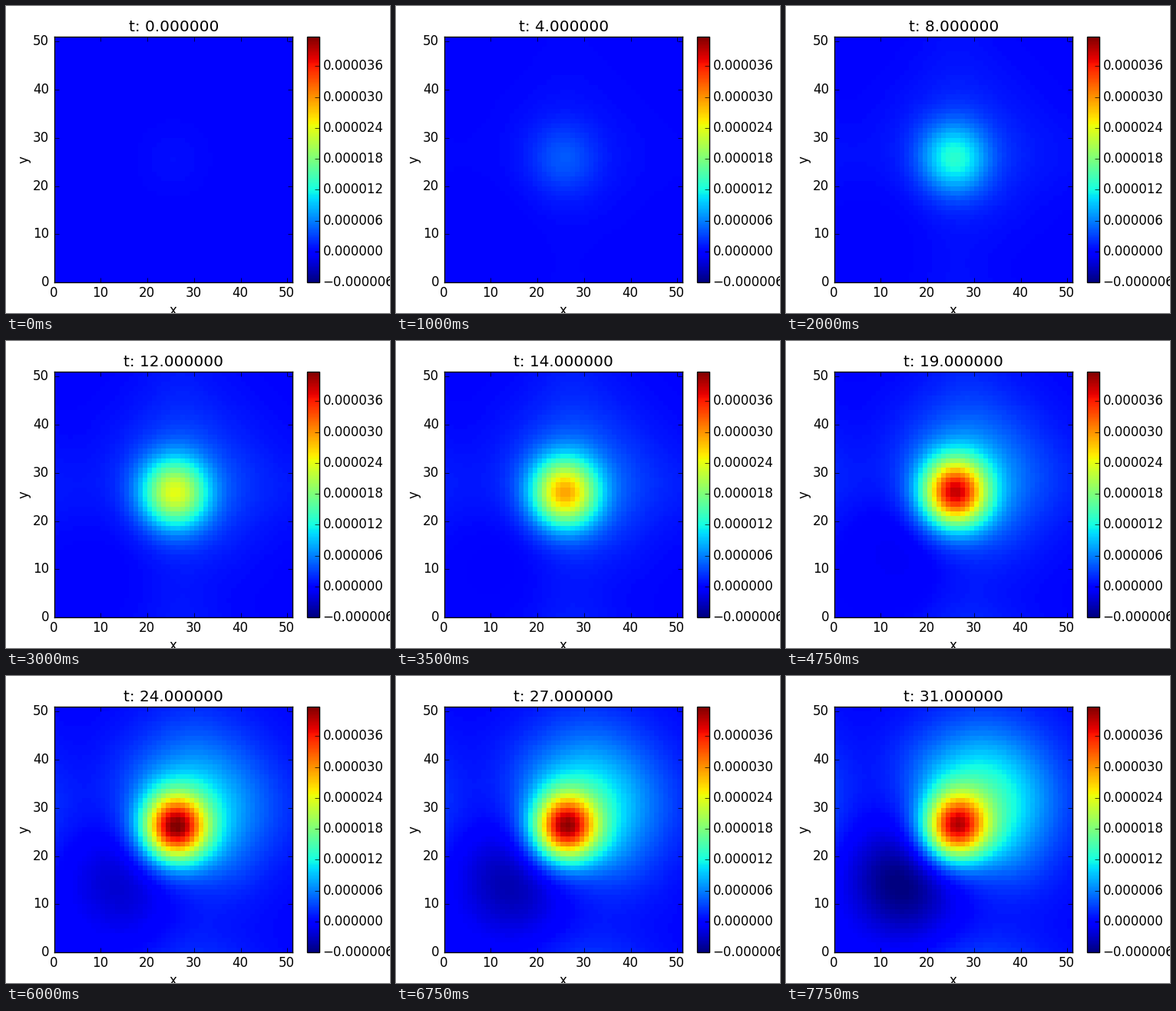
Write a matplotlib script that moves like this. It is 500 px wide and 400 px high and loops after 8000 ms.

```python
import numpy as np
import matplotlib.pyplot as plt
from matplotlib.animation import FuncAnimation
from matplotlib.ticker import FuncFormatter
from matplotlib.transforms import ScaledTranslation

FRAMES, INTERVAL = 32, 250
N = 51
VMIN, VMAX = -6e-6, 41.73e-6

plt.rcParams.update({
    "font.family": "DejaVu Sans", "font.size": 12,
    "axes.titlesize": 14.4, "axes.labelsize": 12,
    "axes.titlepad": 5, "axes.linewidth": 1.0,
    "figure.facecolor": "white", "savefig.facecolor": "white",
    "figure.dpi": 100, "savefig.dpi": 100,
    "xtick.top": True, "ytick.right": True, "ytick.alignment": "center",
    "xtick.major.pad": 3.5, "ytick.major.pad": 4,
})
for axis in ("xtick", "ytick"):
    plt.rcParams.update({
        axis + ".direction": "in", axis + ".labelsize": 12,
        axis + ".major.size": 4, axis + ".major.width": 0.5,
    })

edges = np.arange(N + 1)
X, Y = np.meshgrid(edges[:-1] + 0.5, edges[:-1] + 0.5)

# height of the central peak over time, in units of 1e-6
PEAK = np.polyfit([0, 4, 8, 12, 16, 19, 24, 28, 31],
                  [0.5, 4.3, 13, 23.8, 34, 38.9, 41.4, 40.5, 39], 5)


def bell(d, low, high=None):
    """Gaussian with its own width on each side of zero."""
    width = np.where(d < 0, low, low if high is None else high)
    return np.exp(-d ** 2 / (2 * width ** 2))


def diagonal_bell(dx, dy, across, low, high=None):
    """Bell whose axes lie along the two diagonals."""
    return (bell((dx + dy) / np.sqrt(2), low, high)
            * bell((dx - dy) / np.sqrt(2), across))


def surroundings(x, y, t):
    """Upper right swell, lower left dip and the faint cross arms."""
    p = t / 31
    dx, dy = x - 26 - 5 * p, y - 26 - 4.7 * p
    # the swell runs over the right and top edges and comes back in
    swell = 14.5 * p ** 1.5 * sum(
        diagonal_bell(dx + sx, dy + sy, 10.5, 7, 11)
        for sx, sy in ((0, 0), (N, 0), (0, N)))
    depth = 6.2 * max(t - 10, 0) ** 2 / 441
    dip = depth * diagonal_bell(x - 14.2, y - 14.2, 8, 7)
    arm = 1.3 * (1 - np.exp(-(t / 12) ** 2)) * (1 - 0.8 * p ** 2)
    shift = 26 + 6 * p ** 2
    arms = arm * (bell(x - shift, 5 + 2 * p) + bell(y - shift, 5 + 2 * p))
    return swell - dip + arms


def field(t):
    c = 25.6 + 0.3 * t / 31
    core = np.polyval(PEAK, t) - surroundings(c, c, t)
    width = 5.05 - 0.4 * t / 31
    return 1e-6 * (core * bell(X - c, width) * bell(Y - c, width)
                   + surroundings(X, Y, t))


fig = plt.figure(figsize=(5, 4), dpi=100)
ax = fig.add_axes([0.125, 0.1, 0.62, 0.8])
cax = fig.add_axes([0.78375, 0.1, 0.032, 0.8])

mesh = ax.pcolormesh(edges, edges, field(0), cmap="jet", vmin=VMIN, vmax=VMAX)
ax.set(xlim=(0, N), ylim=(0, N),
       xticks=range(0, N, 10), yticks=range(0, N, 10))
ax.set_xlabel("x", labelpad=3.6)
ax.set_ylabel("y", labelpad=2)
title = ax.set_title("t: 0.000000", x=0.5025)

bar = fig.colorbar(mesh, cax=cax, ticks=np.arange(-1, 7) * 6e-6,
                   format=FuncFormatter(
                       lambda v, _: f"{v:.6f}".replace("-", "\u2212")))
bar.ax.tick_params(left=False, right=True)

# tick labels sit a little left of their nominal place
nudge = ScaledTranslation(-0.008, 0, fig.dpi_scale_trans)
for label in (ax.get_xticklabels() + ax.get_yticklabels()
              + bar.ax.get_yticklabels()):
    label.set_transform(label.get_transform() + nudge)


def update(i):
    mesh.set_array(field(i))
    title.set_text(f"t: {i:.6f}")
    return mesh, title


anim = FuncAnimation(fig, update, frames=FRAMES, interval=INTERVAL,
                     init_func=lambda: update(0), repeat=True, repeat_delay=0)
plt.show()
```
